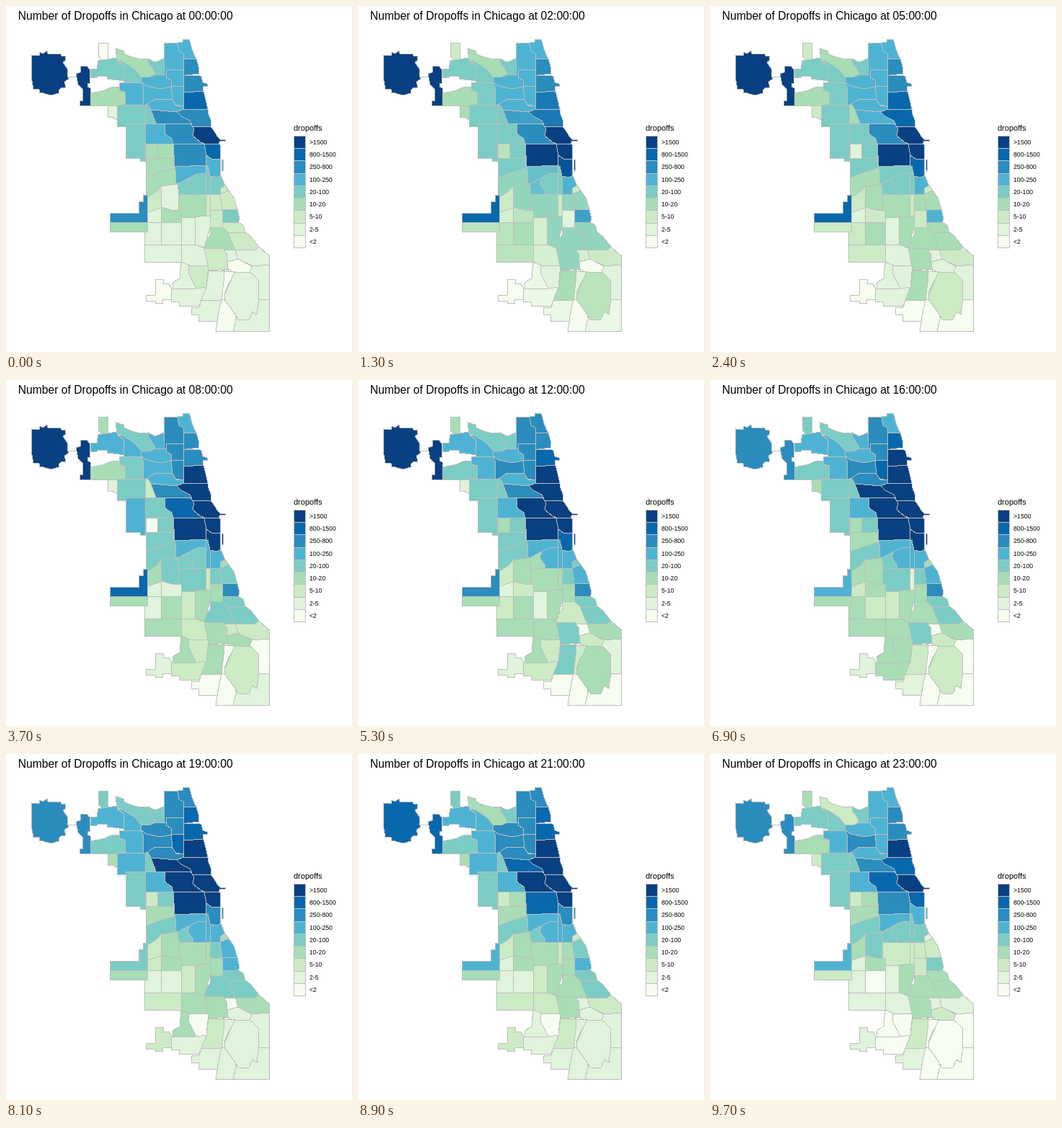
Write an HTML page that moves like this. It is 480x480 px and loops after 10 s.

```html
<!DOCTYPE html>
<html lang="en">
<head>
<meta charset="utf-8">
<title>Dropoffs by hour</title>
<style>
  html, body { margin: 0; width: 100%; height: 100%; overflow: hidden; background: #fff; }
  svg { display: block; width: 480px; height: 480px; font-family: "Liberation Sans", Arial, sans-serif; }
  path, rect { stroke: #bebebe; stroke-width: 1; shape-rendering: crispEdges; }
</style>
</head>
<body>
<svg viewBox="0 0 480 480">
  <text id="title" x="16.7" y="19" font-size="15.7"></text>
  <text x="399" y="173" font-size="11">dropoffs</text>
  <g id="legend" font-size="8.7"></g>
  <!-- data-l: levels at the hours listed in keyHours -->
  <g id="map">
    <!-- far north and north-west -->
    <path data-l="888886676" d="M35 68L46 69 47 64 51 66 57 62 58 66 76 67 77 69H83L82 76 79 78 85 87V98H87L86 102 81 105 83 113 76 114 73 117V121L62 124 52 121 46 120V116L38 115 36 104ZM86 98H98M98 99L97 94 103 92V84L112 83 116 88V107H113V112L117 114V138H102V131H106V115L100 109Z"/>
    <path data-l="022334443" d="M128 51H141V74L133 76 128 69Z"/>
    <path data-l="444555554" d="M117 87H126L128 76 141 74 153 72 156 78 163 82V103H157L140 101V97H128L126 99H117Z"/>
    <path data-l="444555554" d="M155 76L165 78 175 82 188 93V106H163V82Z"/>
    <path data-l="333444432" d="M152 59L163 62V66L175 71 187 74 197 73V79L203 86 207 94 200 98H187L180 89 173 84 165 79 154 74Z"/>
    <path data-l="444545444" d="M197 73L207 78 219 73V98L205 99 207 94 203 86 197 79Z"/>
    <path data-l="555555665" d="M187 98H200L208 95 222 96 229 102V113L214 115 195 111 187 106Z"/>
    <path data-l="555666665" d="M219 51H238L246 50V89H222V96L219 95Z"/>
    <path data-l="555565665" d="M238 51L245 50V46H254L256 52 258 60 262 70 264 73H246V66L240 63Z"/>
    <path data-l="666667776" d="M246 73H264L267 84 268 94 250 96H246Z"/>
    <path data-l="666678776" d="M246 96H267L271 98 273 106 279 108V111H273L274 118 246 120Z"/>
    <path data-l="555666665" d="M222 88H246V112L229 111V103L222 99Z"/>
    <path data-l="555667765" d="M229 111H246V139L235 137 230 128Z"/>
    <path data-l="555566666" d="M188 106L195 111 214 115 229 112 231 130H207L195 138H190Z"/>
    <path data-l="555556665" d="M193 138L207 129H230L236 138 246 139V145L238 147 201 144Z"/>
    <path data-l="544455555" d="M157 106H188L190 112V138H165V119L157 117Z"/>
    <path data-l="333344443" d="M117 121L137 117 148 112H157V118L165 120V136L156 138H117Z"/>
    <path data-l="444444554" d="M154 138L165 137H193V163H166V167H154Z"/>
    <path data-l="133113332" d="M141 138H154V158L148 154H141Z"/>
    <path data-l="444244444" d="M193 137H197L201 144 208 163H193Z"/>

    <!-- centre and west -->
    <path data-l="776888888" d="M246 120L274 118 277 130 280 143H246Z"/>
    <path data-l="676888887" d="M237 147L246 143H280L281 150 284 158V167H258L255 159 243 153Z"/>
    <path data-l="665668876" d="M201 144L237 147 243 153 255 159 257 163H208Z"/>
    <path data-l="444544444" d="M166 163H193V215H186V211H166Z"/>
    <path data-l="544455555" d="M193 163H220V177L230 184 232 191H193Z"/>
    <path data-l="666788887" d="M220 163H256L261 170 259 180 270 189 275 191H232L230 184 220 177Z"/>
    <path data-l="888888888" d="M258 167H284L289 174 294 182 297 185H304V187H297L295 191H275L270 189 259 180 261 170Z"/>
    <path data-l="332033222" d="M194 191H210V211H194Z"/>
    <path data-l="344444433" d="M210 191H232V213L210 211Z"/>
    <path data-l="344443333" d="M194 211H232L233 221 236 224 213 231 194 238Z"/>
    <path data-l="343444444" d="M194 238L213 231 236 224 235 244 238 248 215 250 208 258 195 266Z"/>
    <path data-l="688888876" d="M232 191H275L278 206 277 221 234 223Z"/>
    <path data-l="788888887" d="M275 191H295L298 193 297 212H285L278 208Z"/>
    <path data-l="587878665" d="M278 207L285 212H297L298 236 292 238 283 236 277 222ZM299 213H301V228H299Z"/>
    <path data-l="554555555" d="M234 223L278 221 277 232 265 233 255 238 238 247 235 244 236 232Z"/>
    <path data-l="454434444" d="M238 247L255 238 252 246 259 256V261H239Z"/>
    <path data-l="444455554" d="M255 238L265 233 277 232V261H259V256L252 246Z"/>
    <path data-l="444555554" d="M277 222H280L283 236V261H277Z"/>
    <path data-l="455555554" d="M283 236L292 238 298 235 304 250 297 253V261H283Z"/>
    <path data-l="222343321" d="M297 253L304 249 309 256 300 261H297Z"/>

    <!-- south-west and mid south -->
    <path data-l="143433334" d="M215 250L238 247 240 261V283H230L215 279Z"/>
    <path data-l="222323223" d="M195 266L208 258 215 250V280L210 284H203L196 287Z"/>
    <path data-l="677765455" d="M144 287H184V271H190V262H196V300H144Z"/>
    <path data-l="332333332" d="M144 300H196V313H144Z"/>
    <path data-l="121112211" d="M196 287L203 284 215 280V300H196Z"/>
    <path data-l="332123333" d="M215 279L230 283H243V300H215Z"/>
    <path data-l="343434332" d="M239 261H277V293H243V283H240Z"/>
    <path data-l="222231322" d="M277 261H283V291H277Z"/>
    <path data-l="243444432" d="M283 261H297L300 283H283Z"/>
    <path data-l="243455542" d="M297 261L309 256 316 266 321 282H300Z"/>
    <path data-l="465666554" d="M300 282H321L324 296 322 300H300Z"/>
    <path data-l="211333332" d="M283 283H300V307H283Z"/>
    <path data-l="243444443" d="M300 300H322L329 304 332 314H308L300 307Z"/>
    <path data-l="243444443" d="M308 314H332L339 319 351 334 346 338H318L312 325Z"/>
    <path data-l="343423433" d="M283 307H300L308 314 312 325 318 338H302L275 336 278 325 283 318Z"/>
    <path data-l="132123111" d="M193 313H196V300H215V331H192Z"/>
    <path data-l="133332110" d="M215 300H243V331H215Z"/>
    <path data-l="121212221" d="M243 293H262V331H243Z"/>
    <path data-l="143333333" d="M262 293L277 291H283V307L279 322 275 335 262 331Z"/>
    <path data-l="132333221" d="M192 331H243V355H192Z"/>
    <path data-l="121233321" d="M243 331H262L276 336 279 350 281 362H250L243 355Z"/>

    <!-- far south -->
    <path data-l="243344333" d="M275 336H302L307 345 308 365 281 367 278 350Z"/>
    <path data-l="122233321" d="M318 338H346L351 334 362 344 365 346V360H341L319 350Z"/>
    <path data-l="121200011" d="M302 338H318L322 351 306 355 307 345Z"/>
    <path data-l="000322112" d="M307 355L322 351 341 361 338 369H316L308 366Z"/>
    <path data-l="110100000" d="M300 367L308 365V372L303 378Z"/>
    <path data-l="133342222" d="M281 367H303L302 382 299 408H271L278 390Z"/>
    <path data-l="000000110" d="M298 408L303 407 318 428 320 436 315 451H291Z"/>
    <path data-l="111010110" d="M341 361L365 359V407H345L338 369Z"/>
    <path data-l="110100110" d="M345 407H365V451H315L320 430Z"/>
    <path data-l="011020110" d="M303 368H317V372L309 385 303 400V407L299 408 302 382Z"/>
    <path data-l="132232110" d="M317 369H338L343 373 350 380V413L348 428 342 424 337 435H322L318 428 303 407 304 399 311 383Z"/>
    <path data-l="110001111" d="M271 408H299L296 420 293 437H267V428H257V418H268Z"/>
    <path data-l="110333310" d="M243 355L255 360 253 370 264 392 231 393 232 383 241 378Z"/>
    <path data-l="211223000" d="M253 360H281L278 390 264 392 253 370Z"/>
    <path data-l="110223110" d="M229 393L264 392 278 390 271 408 268 416H240V410H229Z"/>
    <path data-l="000111221" d="M208 379H218V385H226L230 392 229 407H217V413L207 412V409H194V401H207Z"/>
  </g>
</svg>
<script>
const palette = ['f7fcf0', 'e0f3db', 'ccebc5', 'a8ddb5', '7bccc4', '4eb3d3', '2b8cbe', '0868ac', '084081']
  .map(hex => [0, 2, 4].map(i => parseInt(hex.slice(i, i + 2), 16)));
const labels = ['<2', '2-5', '5-10', '10-20', '20-100', '100-250', '250-800', '800-1500', '>1500'];
const keyHours = [0, 2, 3, 8, 12, 16, 19, 21, 23];
const LOOP = 10000, FADE = 100, LAST_HOUR = 23, KEY_HEIGHT = 17.28;

const rgb = color => `rgb(${color.map(Math.round)})`;
const blend = (a, b, k) => a.map((v, i) => v + (b[i] - v) * k);
const fadeStart = hour => hour < 6 ? 300 + 500 * hour : 800 + 400 * hour;

function levelAt(levels, hour) {
  const next = Math.max(1, keyHours.findIndex(h => h >= hour));
  const [h0, h1] = [keyHours[next - 1], keyHours[next]];
  const [a, b] = [+levels[next - 1], +levels[next]];
  return Math.round(a + (b - a) * (hour - h0) / (h1 - h0));
}

const areas = [...document.querySelectorAll('#map path')].map(path => ({
  path,
  colors: Array.from({ length: 24 }, (_, hour) => palette[levelAt(path.dataset.l, hour)])
}));

document.getElementById('legend').innerHTML = labels.map((label, level) => {
  const y = 180.2 + KEY_HEIGHT * (8 - level);
  return `<rect x="399.5" y="${y}" width="16" height="${KEY_HEIGHT}" fill="${rgb(palette[level])}"/>
    <text x="421" y="${y + 11.5}">${label.replace('<', '&lt;').replace('>', '&gt;')}</text>`;
}).join('');

const title = document.getElementById('title');
let shown = '';

function draw() {
  const t = performance.now() % LOOP;
  let hour = 0;
  while (hour < LAST_HOUR && t >= fadeStart(hour) + FADE) hour++;
  const mix = hour < LAST_HOUR && t >= fadeStart(hour) ? 0.5 : 0;
  const state = `${hour}/${mix}`;
  if (state !== shown) {
    shown = state;
    title.textContent = `Number of Dropoffs in Chicago at ${String(hour).padStart(2, '0')}:00:00`;
    for (const { path, colors } of areas) {
      path.setAttribute('fill', rgb(blend(colors[hour], colors[Math.min(hour + 1, LAST_HOUR)], mix)));
    }
  }
  requestAnimationFrame(draw);
}
draw();
</script>
</body>
</html>
```
